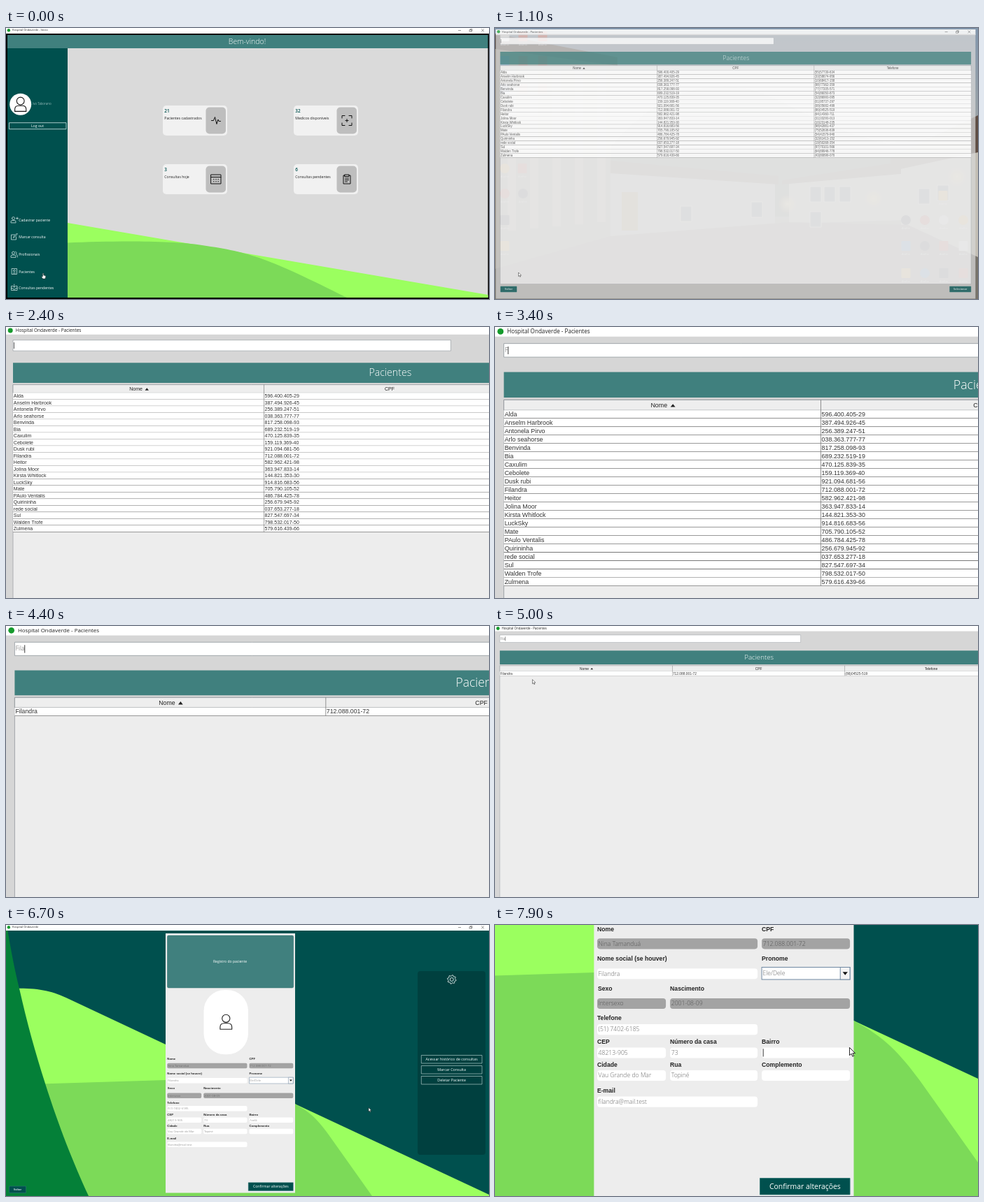
Recreate the animation shown at these times as an HTML page with a canvas. Size 690 by 388 pixels, loop 8000 ms.

```html
<!DOCTYPE html>
<html lang="pt">
<head>
<meta charset="utf-8">
<title>Hospital Ondaverde</title>
<style>
html, body { margin: 0; width: 100%; height: 100%; overflow: hidden; background: #000; }
canvas { display: block; width: 100vw; height: 100vh; }
</style>
</head>
<body>
<canvas id="stage"></canvas>
<script>
const W = 690, H = 388, LOOP = 8000, STEP = 100;
const canvas = document.getElementById('stage');
const ctx = canvas.getContext('2d');
const UI = '"Open Sans", "Noto Sans", sans-serif';
const SANS = '"Liberation Sans", Arial, sans-serif';
const TEAL = '#40807e', DEEP = '#00504e', LIME = '#9bff5f', GRASS = '#7cda58';
const HOSPITAL = 'Hospital Ondaverde';

const people = ['Alda', 'Anselm Harbrook', 'Antonela Pirvo', 'Arlo seahorse', 'Benvinda', 'Bia',
  'Caxulim', 'Cebolete', 'Dusk rubi', 'Filandra', 'Heitor', 'Jolina Moor', 'Kirsta Whitlock',
  'LuckSky', 'Mate', 'PAulo Ventalis', 'Quirininha', 'rede social', 'Sul', 'Walden Trofe', 'Zulmena'];

// Fills each # of a pattern with a seeded digit.
function digits(pattern, seed) {
  let n = seed * 7919 + 104729;
  return pattern.replace(/#/g, () => {
    n = (n * 16807) % 2147483647;
    return Math.floor(n / 977) % 10;
  });
}
const patients = people.map((name, i) => ({
  name, cpf: digits('###.###.###-##', i + 1), phone: digits('(##)#####-###', i + 60)
}));
const chosen = patients[9];

const clamp = v => Math.max(0, Math.min(1, v));
const ramp = (t, a, b) => clamp((t - a) / (b - a));
const smooth = u => u * u * (3 - 2 * u);
const easeOut = u => 1 - (1 - u) ** 3;
const lerp = (a, b, u) => a + (b - a) * u;

function box(x, y, x2, y2, fill, r = 0, stroke, lw = 0.5) {
  ctx.beginPath();
  ctx.roundRect(x, y, x2 - x, y2 - y, r);
  if (fill) { ctx.fillStyle = fill; ctx.fill(); }
  if (stroke) { ctx.strokeStyle = stroke; ctx.lineWidth = lw; ctx.stroke(); }
}
function disc(x, y, r, fill) {
  ctx.beginPath();
  ctx.arc(x, y, r, 0, 7);
  ctx.fillStyle = fill;
  ctx.fill();
}
function shape(d, fill) {
  ctx.fillStyle = fill;
  ctx.fill(new Path2D(d));
}
function label(s, x, y, size, fill, { font = UI, weight = 400, align = 'left' } = {}) {
  ctx.font = `${weight} ${size}px ${font}`;
  ctx.textAlign = align;
  ctx.textBaseline = 'middle';
  ctx.fillStyle = fill;
  ctx.fillText(s, x, y);
}
function at(x, y, scale, draw) {
  ctx.save();
  ctx.translate(x, y);
  ctx.scale(scale, scale);
  draw();
  ctx.restore();
}
function icon(d, x, y, color, lw = 0.7, scale = 1) {
  at(x, y, scale, () => {
    ctx.strokeStyle = color;
    ctx.lineWidth = lw;
    ctx.lineJoin = ctx.lineCap = 'round';
    ctx.stroke(new Path2D(d));
  });
}

const icons = {
  person: 'M-4 -3a4 4 0 1 0 8 0a4 4 0 1 0 -8 0M-6 8v-2q0 -4 4 -4h4q4 0 4 4v2z',
  addUser: 'M-3 -2a2 2 0 1 0 4 0a2 2 0 1 0 -4 0M-4.5 4v-1q0 -2 2 -2h3q2 0 2 2v1zM3 -2h3M4.5 -3.5v3',
  edit: 'M1 -3h-5v7h7v-4M-1 1l1 -2l4 -4l1 1l-4 4z',
  doctor: 'M-3 -2a2 2 0 1 0 4 0a2 2 0 1 0 -4 0M-4.5 4v-1q0 -2 2 -2h3q2 0 2 2v1zM2 -4q3 1 1 4q2 0 2 4',
  sheet: 'M-3 -4h7v8h-7zM-1 -1a1.4 1.4 0 1 0 2.8 0a1.4 1.4 0 1 0 -2.8 0M-1.2 2.4h3.2',
  inbox: 'M-2 -2h-2v6h8.5v-6h-2M-4 1h2l1 1.5h2.5l1 -1.5h2M0.2 -4.5v4M-1.2 -1.8l1.4 1.6l1.4 -1.6',
  pulse: 'M-6.5 0h3l2 -5l2.5 10l2 -6.5l1.2 2.5h2.3',
  scan: 'M-7 -3.5v-3.5h4M3 -7h4v3.5M7 3.5v3.5h-4M-3 7h-4v-3.5M-2 0h4M0 -2v4',
  calendar: 'M-7 -6.5h14v13h-14zM-7 -3h14M-3.5 0h.5M-.2 0h.5M3 0h.5M-3.5 3.2h.5M-.2 3.2h.5M3 3.2h.5',
  board: 'M-3 -5.5h-2v12h10v-12h-2M-3 -6.5h6v2.5h-6zM-2.5 -1.5h5M-2.5 1h5M-2.5 3.5h3'
};

function titleBar(text) {
  box(0, 0, W, 8, '#fff');
  disc(3.9, 3.2, 2.2, '#159a2c');
  label(text, 8.6, 3.4, 4.05, '#222');
  icon('M-1.6 0h3.2', 648, 3.5, '#333', 0.5);
  icon('M-1.6 -.8h2.6v2.6h-2.6zM-.7 -.8v-1h2.6v2.6h-.8', 664, 3.4, '#333', 0.5);
  icon('M-1.6 -1.6l3.2 3.2M-1.6 1.6l3.2 -3.2', 681, 3.4, '#333', 0.5);
}

function card(x, y, count, text, glyph) {
  box(x, y, x + 92, y + 43, '#f1f1f1', 5);
  box(x + 61.5, y + 2.5, x + 90, y + 40.5, '#bebebe', 5);
  label(count, x + 2.3, y + 8, 6.4, DEEP, { weight: 600 });
  label(text, x + 2.3, y + 18.3, 5.15, '#222');
  icon(icons[glyph], x + 76, y + 21.5, '#111', 1);
}

function home() {
  box(0, 0, W, H, '#000');
  titleBar(HOSPITAL + ' - Inicio');
  box(2, 10, 688.5, 29, TEAL);
  label('Bem-vindo!', 344.5, 20, 10.5, '#fff', { weight: 300, align: 'center' });
  box(88, 29, 688.5, 386, '#dadada');
  shape('M88 279L688.5 382V386H88z', LIME);
  shape('M88 307.5C150 305 235 304 280 311C350 321 375 330 487 386H88z', GRASS);
  box(2, 29, 88, 386, DEEP);
  disc(20.7, 109.3, 15.5, '#fff');
  icon(icons.person, 20.7, 108.6, '#111', 0.8, 1.35);
  label('Ivo Taborano', 38, 108.3, 4.6, '#dfeeee', { weight: 300 });
  box(4.5, 135.7, 86, 144.7, null, 0, '#d5e5e4', 0.8);
  label('Log out', 45, 140.4, 5.2, '#fff', { align: 'center' });
  [['Cadastrar paciente', 'addUser', 275], ['Marcar consulta', 'edit', 299.5],
   ['Profissionais', 'doctor', 324.5], ['Pacientes', 'sheet', 349], ['Consultas pendentes', 'inbox', 372]
  ].forEach(([text, glyph, y]) => {
    icon(icons[glyph], 11.5, y - 0.5, '#e3f0ef', 0.7);
    label(text, 18.3, y + 0.3, 5.1, '#fff');
  });
  card(224, 111, '21', 'Pacientes cadastrados', 'pulse');
  card(411, 111, '32', 'Medicos disponiveis', 'scan');
  card(224, 195, '3', 'Consultas hoje', 'calendar');
  card(411, 195, '6', 'Consultas pendentes', 'board');
}

function caret(x, y) {
  box(x, y - 2.8, x + 0.45, y + 2.8, '#222');
}
function smallButton(text, x, y, x2, y2) {
  box(x, y, x2, y2, DEEP, 0, '#2c7472', 0.6);
  label(text, (x + x2) / 2, (y + y2) / 2, 3.9, '#fff', { weight: 600, align: 'center' });
}

function list(t) {
  const left = 6.3, col = 225.8, right = 683.7, top = 59.4, pitch = 5.975;
  const typed = t < 3300 ? '' : chosen.name.slice(0, 1 + Math.floor((t - 3300) / 200)).slice(0, 4);
  const rows = t < 3500 ? patients : [chosen];
  box(0, 0, W, H, '#d6d6d6');
  titleBar(HOSPITAL + ' - Pacientes');
  box(0, 6.8, W, 8.2, '#d6d6d6');
  box(left, 11.8, 400, 21.5, '#fff', 0, '#8f979c', 0.4);
  label(typed, 7, 16.8, 4.3, '#555', { weight: 300 });
  caret(7 + (typed ? ctx.measureText(typed).width : 0), 16.7);
  box(left, 32.2, right, 50.4, TEAL);
  label('Pacientes', 345.5, 42, 8.9, '#fff', { weight: 300, align: 'center' });
  box(left, 52, right, 367, '#ededed', 0, '#8f9499', 0.4);
  box(left, 52, right, top, '#eee', 0, '#8a8f94', 0.4);

  const head = { font: SANS, align: 'center' };
  label('Nome', 116.8, 56.1, 4.45, '#222', head);
  shape('M125 57.1l1.7 -2.2l1.7 2.2z', '#222');
  label('CPF', left + col * 1.5, 56.1, 4.45, '#222', head);
  label('Telefone', left + col * 2.5, 56.1, 4.45, '#222', head);

  rows.forEach((p, i) => {
    const y = top + i * pitch;
    const picked = t >= 5300;
    box(left, y, right, y + pitch, picked ? '#b8cfe5' : '#fff');
    box(left, y + pitch - 0.4, right, y + pitch, '#777');
    [p.name, p.cpf, p.phone].forEach((s, k) =>
      label(s, left + 0.5 + k * col, y + pitch / 2 + 0.1, 4.45, '#333', { font: SANS }));
  });
  const end = top + rows.length * pitch;
  [1, 2].forEach(k => box(left + k * col - 0.2, 52, left + k * col + 0.2, end, '#777'));
  smallButton('Voltar', 6.8, 370.5, 30, 378.5);
  smallButton('Selecionar', 653, 370.5, 683.5, 378.5);
}

function field(x, x2, y, text, locked) {
  box(x, y, x2, y + 7.5, locked ? '#a3a3a3' : '#fff', 2);
  label(text, x + 0.8, y + 4, 4.3, locked ? '#555' : '#666', { weight: 300 });
}

function record(t) {
  const a = 230.3, b = 282.2, c = 347.5, endA = 279.2, endB = 344.5, endC = 410.3;
  box(0, 0, W, H, DEEP);
  shape('M10 91C45 90 65 94 90 106L228 171L413 256.3L690 386V388H10z', LIME);
  shape('M50 227.5L228 222L413 256.3C435 268 446 280 460 299L523 388H50z', GRASS);
  shape('M0 8H2.5C7 36 12 62 19 91C30 140 42 183 56 227C76 290 96 340 118 388H0z', '#048038');
  titleBar(HOSPITAL);

  box(228, 12, 413, 383.5, '#ededed');
  box(230.4, 15, 410.7, 90, TEAL, 2, '#30706e', 0.5);
  label('Registro do paciente', 320, 53, 5.05, '#fff', { align: 'center' });
  box(282.5, 93, 346, 185.3, '#fff', 30);
  icon(icons.person, 314.3, 138, '#222', 0.8, 1.4);

  [['Nome', a, 191.5], ['CPF', c, 191.5], ['Nome social (se houver)', a, 212.5], ['Pronome', c, 212.5],
   ['Sexo', a + 0.5, 233.9], ['Nascimento', b, 233.9], ['Telefone', a, 254.9], ['CEP', a, 271.4],
   ['Número da casa', b, 271.4], ['Bairro', c, 271.4], ['Cidade', a, 287.9], ['Rua', b, 287.9],
   ['Complemento', c, 287.9], ['E-mail', a, 306.3]
  ].forEach(([s, x, y]) => label(s, x, y, 4.3, '#222', { font: SANS, weight: 700 }));

  field(a, endB, 197.7, 'Nina Tamanduá', true);
  field(c, endC, 197.7, chosen.cpf, true);
  field(a, endB, 219.1, chosen.name);
  box(c, 218.2, endC, 227, '#fff', 0, '#6f88a2', 0.5);
  label('Ele/Dele', c + 0.7, 222.7, 4.3, '#666', { weight: 300 });
  box(403.4, 218.2, endC, 227, '#f4f4f4', 0, '#6f88a2', 0.5);
  shape('M405.1 221.6h3.6l-1.8 2.2z', '#111');
  field(a, endA, 240.4, 'Intersexo', true);
  field(b, endC, 240.4, '2001-08-09', true);
  field(a, endB, 258.9, '(51) 7402-6185');
  field(a, endA, 275.5, '48213-905');
  field(b, endB, 275.5, '73');
  const cleared = t >= 7600;
  field(c, endC, 275.5, cleared ? '' : 'Avelã');
  if (cleared) caret(c + 0.8, 279.2);
  field(a, endA, 291.7, 'Vau Grande do Mar');
  field(b, endB, 291.7, 'Topiné');
  field(c, endC, 291.7, '');
  field(a, endB, 310.5, 'filandra@mail.test');
  box(346.2, 368.8, endC, 380.5, DEEP, 0, '#2c7472', 0.4);
  label('Confirmar alterações', 378.3, 375, 5.2, '#fff', { align: 'center' });

  smallButton('Voltar', 4.5, 374, 28.5, 383.5);
  box(588, 66, 685, 329, '#00403f', 4);
  gear(636.8, 78);
  ['Acessar histórico de consultas', 'Marcar Consulta', 'Deletar Paciente'].forEach((s, i) => {
    const y = 186.5 + i * 15;
    box(593.3, y, 680, y + 11.5, null, 0, '#c9dcdb', 0.6);
    label(s, 636.6, y + 6, 5.3, '#fff', { align: 'center' });
  });
}

function gear(x, y) {
  ctx.beginPath();
  for (let i = 0; i < 32; i++) {
    const r = i % 4 < 2 ? 6.3 : 4.9, q = (i + 0.5) * Math.PI / 16;
    ctx.lineTo(x + r * Math.cos(q), y + r * Math.sin(q));
  }
  ctx.closePath();
  ctx.moveTo(x + 2.5, y);
  ctx.arc(x, y, 2.5, 0, 7);
  ctx.strokeStyle = '#fff';
  ctx.lineWidth = 0.8;
  ctx.stroke();
}

function shortcut(x, y, color, round) {
  if (round) disc(x, y, 7, color);
  else box(x - 6.5, y - 7, x + 6.5, y + 7, color, 1);
  label('Atalho', x, y + 12, 4, '#fff', { align: 'center' });
}

function desktop() {
  const sky = ctx.createLinearGradient(0, 0, 0, H);
  sky.addColorStop(0, '#8296ac');
  sky.addColorStop(0.45, '#a2a6a4');
  sky.addColorStop(1, '#6c6a62');
  box(0, 0, W, H, sky);
  shape('M150 190C200 120 270 75 350 85C410 95 450 140 560 165L690 150V270H150z', '#62685a');
  shape('M0 20L165 50V300L0 345z', '#8d8678');
  for (let i = 0; i < 5; i++) box(18 + i * 32, 55, 30 + i * 32, 290 - i * 3, '#b9b3a5');
  shape('M0 8L175 42V54L0 30z', '#5a5048');
  shape('M165 205L400 222V285L165 300z', '#b5b3ac');
  shape('M165 190L405 212V224L165 208z', '#564a42');
  shape('M420 220L585 205V275L420 280z', '#bebbb2');
  shape('M410 218L590 190V208L410 224z', '#574940');
  shape('M580 185L690 165V330L580 285z', '#c3beb4');
  shape('M565 185L690 125V178L565 205z', '#5d4c42');
  shape('M0 345L165 298L420 278L590 282L690 328V388H0z', '#77736a');
  box(181, 235, 204, 290, '#987f42');
  [[265, 255], [366, 249], [450, 227], [470, 227], [492, 227], [450, 263], [605, 230], [632, 225]]
    .forEach(([x, y]) => box(x, y, x + 16, y + 22, '#54636c', 0, '#ddd', 1));
  [[418, 252], [541, 244], [660, 213]].forEach(([x, y]) => {
    const glow = ctx.createRadialGradient(x, y, 0, x, y, 14);
    glow.addColorStop(0, '#ffe9a8');
    glow.addColorStop(1, '#ffd98000');
    disc(x, y, 14, glow);
  });
  const hues = ['#2f7fc6', '#c64a3a', '#e6ac3c', '#2b3440', '#e7e7e7'];
  [12, 47, 87].forEach((y, r) => [14, 40, 68].forEach((x, k) => shortcut(x, y, hues[k ? 1 : r ? 0 : 4])));
  [[14, 201, 2, 1], [39, 201, 1], [14, 237, 1, 1], [40, 237, 3, 1], [14, 275, 3], [14, 312, 2], [640, 240, 2]]
    .forEach(([x, y, h, round]) => shortcut(x, y, hues[h], round));
  [275, 312, 351].forEach((y, r) => [587, 614, 641, 669].forEach((x, k) =>
    shortcut(x, y, hues[(r * 2 + k * 3 + 3) % 5], r === 0 || k === 1)));
}

// A window opens or closes with a fade and a slight change of scale.
function pane(draw, t, shown, ax = W / 2, ay = H / 2) {
  if (shown <= 0) return;
  const s = 1 - 0.028 * (1 - shown);
  ctx.save();
  ctx.globalAlpha = shown;
  ctx.translate(ax * (1 - s), ay * (1 - s));
  ctx.scale(s, s);
  draw(t);
  ctx.restore();
}

const path = [[0, 53, 351], [100, 53, 351], [400, 33.5, 350], [4300, 33.5, 350], [4900, 48, 70], [5000, 49, 70.2],
  [5200, 48, 62], [5400, 48, 62], [5900, 664, 369], [6200, 664, 369], [6650, 518, 261.5],
  [6800, 518, 261.5], [7400, 410, 275.5], [8000, 410, 275.5]];

function pointer(t) {
  const i = path.findIndex(p => p[0] > t);
  const [t0, x0, y0] = path[i - 1], [t1, x1, y1] = path[i];
  const u = smooth(ramp(t, t0, t1));
  at(lerp(x0, x1, u), lerp(y0, y1, u), 1, () => {
    const d = t < 700
      ? 'M-.6 .6Q0 -.4 .7 .6V3L3 3.5Q4 4 3.7 5.4L3 8H-.4L-2.2 5.3Q-2 4.4 -.6 5z'
      : 'M0 0V5.6L1.3 4.4L2.2 6.4L3.1 6L2.2 4.1H4z';
    const shapePath = new Path2D(d);
    ctx.fillStyle = '#fff';
    ctx.fill(shapePath);
    ctx.strokeStyle = '#111';
    ctx.lineWidth = 0.45;
    ctx.stroke(shapePath);
  });
}

function camera(t) {
  if (t < 6200) {
    const u = smooth(ramp(t, 1520, 3100)) - smooth(ramp(t, 4300, 5160));
    return [1 + 1.006 * u, 0, 0];
  }
  return [1 + 1.006 * smooth(ramp(t, 6750, 7750)), 314.1, 375];
}

function render(t) {
  const dpr = window.devicePixelRatio || 1;
  const w = Math.round(innerWidth * dpr), h = Math.round(innerHeight * dpr);
  if (canvas.width !== w || canvas.height !== h) { canvas.width = w; canvas.height = h; }
  const [s, fx, fy] = camera(t);
  ctx.setTransform(w / W, 0, 0, h / H, 0, 0);
  ctx.translate(fx * (1 - s), fy * (1 - s));
  ctx.scale(s, s);

  const listIn = easeOut(ramp(t, 1000, 1270)), recordIn = easeOut(ramp(t, 6380, 6650));
  const homeOut = ramp(t, 620, 880), listOut = ramp(t, 6120, 6380);
  if ((t > 620 && listIn < 1) || (t > 6120 && recordIn < 1)) desktop();
  if (t < 1000) pane(home, t, 1 - homeOut);
  else if (t < 6380) pane(list, t, listIn * (1 - listOut), 170, 300);
  else pane(record, t, recordIn);
  pointer(t);
}

const start = performance.now();
function tick() {
  const t = (performance.now() - start) % LOOP;
  render(Math.floor(t / STEP) * STEP);
  requestAnimationFrame(tick);
}
tick();
</script>
</body>
</html>
```
